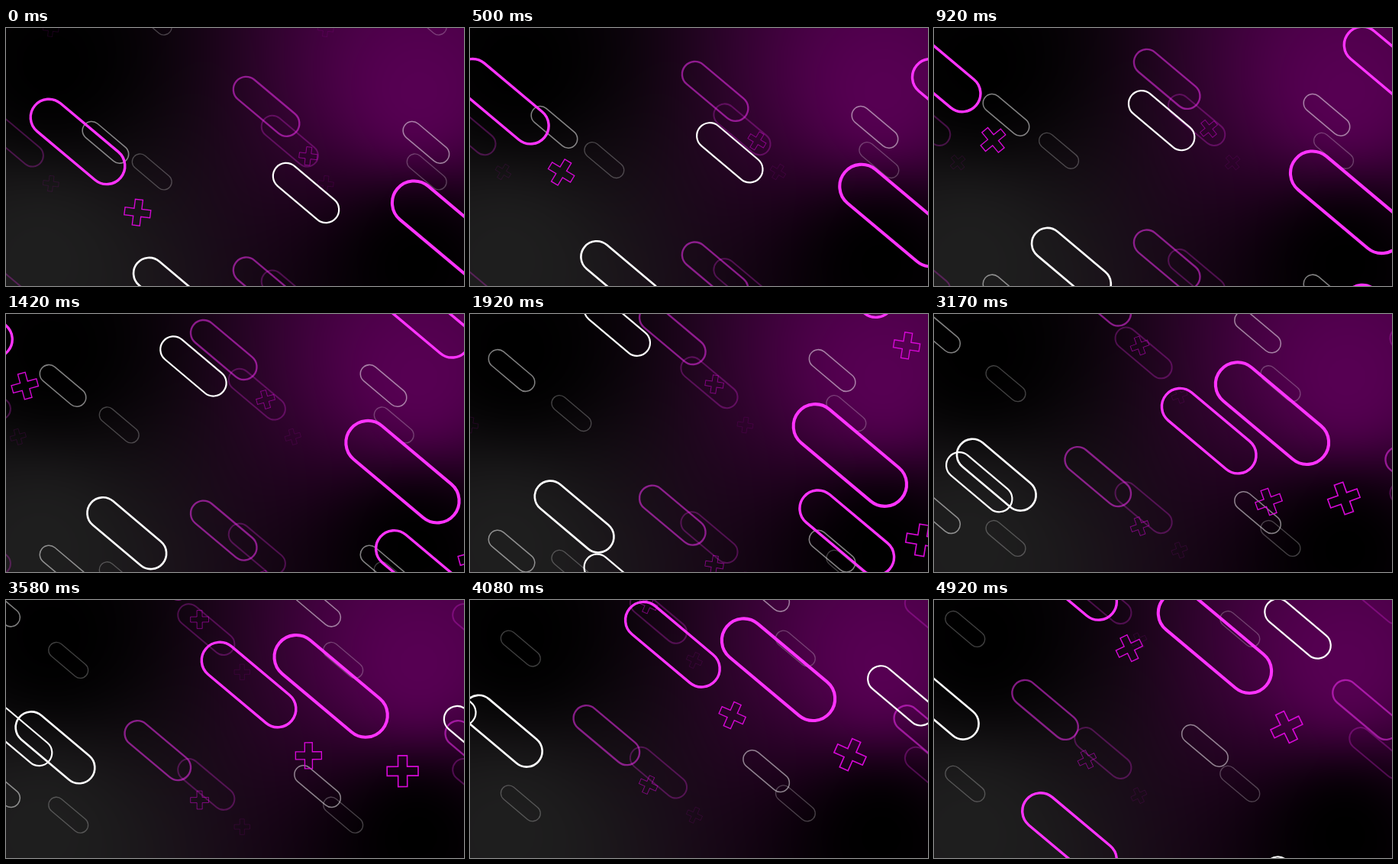
Write an HTML page with a canvas that moves like this. It is 600 px wide and 338 px high and loops after 5 s.

```html
<!DOCTYPE html>
<html lang="en">
<head>
<meta charset="utf-8">
<title>Drifting capsules</title>
<style>
  html, body { margin: 0; width: 100%; height: 100%; overflow: hidden; background: #000; }
  canvas { display: block; width: 600px; height: 338px; }
</style>
</head>
<body>
<canvas id="stage" width="600" height="338"></canvas>
<script>
const W = 600, H = 338, LOOP = 5000, FRAMES = 60, CLOCK = 30;
const ctx = document.getElementById('stage').getContext('2d');

// One tile repeats in every layer; speed is in px per second, up and to the left.
const layers = [
  { scale: 0.6, x: 334, y: 114, speed: 30.7, alpha: 0.25, crossAlpha: 0.14 },
  { scale: 0.7, x: 297, y: 63, speed: 39.9, alpha: 0.5, crossAlpha: 0.55 },
  { scale: 1, x: 31, y: 92, speed: 105.4, alpha: 1, crossAlpha: 1 },
  { scale: 1.2, x: 504.5, y: 199, speed: 43.3, alpha: 1, crossAlpha: 1 }
];

const mod = (a, n) => ((a % n) + n) % n;

// Four colour points blended by inverse distance.
function makeBackground() {
  const points = [
    { x: 60, y: 50, rgb: [0, 0, 0] },
    { x: 540, y: 84, rgb: [86, 0, 82] },
    { x: 45, y: 300, rgb: [30, 30, 30] },
    { x: 538, y: 306, rgb: [0, 0, 0] }
  ];
  const canvas = document.createElement('canvas');
  canvas.width = W;
  canvas.height = H;
  const c = canvas.getContext('2d');
  const image = c.createImageData(W, H);
  for (let y = 0, i = 0; y < H; y++) {
    for (let x = 0; x < W; x++, i += 4) {
      let total = 0;
      const sum = [0, 0, 0];
      for (const p of points) {
        const weight = 1 / Math.pow((x - p.x) ** 2 + (y - p.y) ** 2 + 1, 1.2);
        total += weight;
        for (let k = 0; k < 3; k++) sum[k] += weight * p.rgb[k];
      }
      for (let k = 0; k < 3; k++) image.data[i + k] = Math.round(sum[k] / total);
      image.data[i + 3] = 255;
    }
  }
  c.putImageData(image, 0, 0);
  return canvas;
}

// Slanted capsule whose outer bounding box starts at x, y.
function capsule(x, y, w, h, radius, line, color) {
  const r = radius - line / 2;
  const dx = w - 2 * radius, dy = h - 2 * radius;
  const cx = x + radius, cy = y + radius;
  const angle = Math.atan2(dy, dx);
  ctx.beginPath();
  ctx.arc(cx, cy, r, angle + Math.PI / 2, angle + Math.PI * 1.5);
  ctx.arc(cx + dx, cy + dy, r, angle - Math.PI / 2, angle + Math.PI / 2);
  ctx.closePath();
  ctx.lineWidth = line;
  ctx.strokeStyle = color;
  ctx.stroke();
}

function cross(x, y, degrees) {
  const a = 5, b = 17;
  ctx.save();
  ctx.translate(x, y);
  ctx.rotate(degrees * Math.PI / 180);
  ctx.beginPath();
  for (let i = 0; i < 4; i++) {
    ctx.lineTo(-a, -a);
    ctx.lineTo(-a, -b);
    ctx.lineTo(a, -b);
    ctx.rotate(Math.PI / 2);
  }
  ctx.closePath();
  ctx.lineWidth = 1.35;
  ctx.strokeStyle = '#d808d8';
  ctx.stroke();
  ctx.restore();
}

function drawTile(degrees, alpha, crossAlpha) {
  ctx.globalAlpha = alpha;
  capsule(-0.5, -0.5, 127, 114.8, 25.6, 3.4, '#ff33ff');
  capsule(317.7, 83.8, 88.6, 80.4, 18.2, 2.2, '#fff');
  ctx.globalAlpha = crossAlpha;
  cross(141.3, 149.7, degrees);
}

function drawLayer({ scale, x, y, speed, alpha, crossAlpha }, seconds) {
  const pw = W * scale, ph = H * scale;
  const left = mod(x - speed * seconds, pw) - pw;
  const top = mod(y - speed * seconds, ph) - ph;
  for (let ty = top; ty < H; ty += ph) {
    for (let tx = left; tx < W; tx += pw) {
      ctx.save();
      ctx.translate(tx, ty);
      ctx.scale(scale, scale);
      drawTile(7 + 48.4 * seconds, alpha, crossAlpha);
      ctx.restore();
    }
  }
}

const background = makeBackground();
const start = performance.now();

function render() {
  const t = mod(performance.now() - start, LOOP);
  const step = Math.min(FRAMES - 1, Math.floor((t + 4) * FRAMES / LOOP));
  // Poses fall on a 30 per second clock, so the steps alternate in length.
  const seconds = Math.floor(step * LOOP / 1000 * CLOCK / FRAMES) / CLOCK;
  ctx.drawImage(background, 0, 0);
  for (const layer of layers) drawLayer(layer, seconds);
  requestAnimationFrame(render);
}
render();
</script>
</body>
</html>
```
